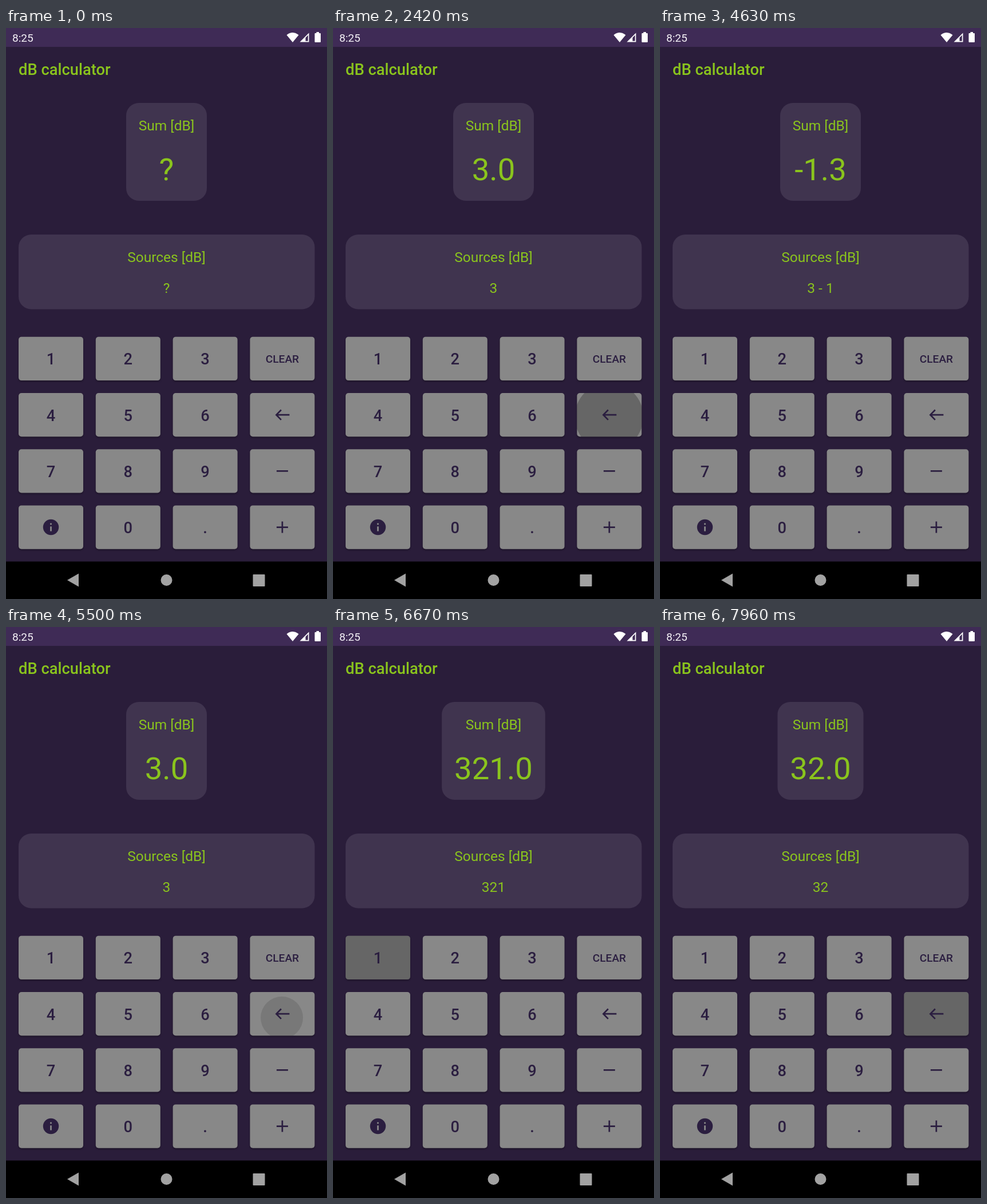
Write an HTML page that moves like this. It is 561x998 px and loops after 8000 ms.

```html
<!DOCTYPE html>
<html lang="en">
<head>
<meta charset="utf-8">
<title>dB calculator</title>
<style>
html, body { margin: 0; width: 100%; height: 100%; overflow: hidden; background: #2a1d3a; }
svg { display: block; width: 561px; height: 998px; font-family: Roboto, sans-serif; }
.green { fill: #8ac41d; }
.mid { text-anchor: middle; }
.medium { font-weight: 500; }
.label { font-size: 24.5px; }
.card { fill: #40344f; }
.ink { fill: #2b1e40; }
.line { fill: none; stroke: #2b1e40; stroke-width: 2.7; }
</style>
</head>
<body>
<svg viewBox="0 0 561 998">
  <defs><filter id="soft" x="-10%" y="-10%" width="120%" height="130%"><feGaussianBlur stdDeviation="1.6"/></filter></defs>
  <rect width="561" height="998" fill="#2a1d3a"/>
  <rect width="561" height="33" fill="#3f2b56"/>
  <text x="11" y="24" font-size="19.1" fill="#f4f1f6">8:25</text>
  <g fill="#fff">
    <path d="M490.5 12.2Q501 4 511.500 12.200L501 25Z"/>
    <path d="M513.500 24.500L529.500 8.500V24.500ZM523.500 22.800H527.800V12.600L523.500 16.900Z" fill-rule="evenodd"/>
    <path d="M540 9H542.500V7H547V9H549A1 1 0 0 1 550 10V24A1 1 0 0 1 549 25H540.500A1 1 0 0 1 539.500 24V10Z"/>
  </g>
  <text class="green medium" x="22" y="81.500" font-size="27.3">dB calculator</text>

  <rect id="sumCard" class="card" y="131" height="171" rx="22"/>
  <text class="green mid label" x="280.500" y="179">Sum [dB]</text>
  <text id="sum" class="green mid" x="280.500" y="265.500" font-size="54.5"></text>

  <rect class="card" x="22" y="361" width="517.500" height="130.500" rx="22"/>
  <text class="green mid label" x="280.500" y="409">Sources [dB]</text>
  <text id="sources" class="green mid label" x="280.500" y="463"></text>

  <g id="keys"></g>

  <rect y="932.500" width="561" height="65.500" fill="#000"/>
  <g fill="#a2a2a2">
    <path d="M107 965L127 953.500V976.500Z"/>
    <circle cx="280.500" cy="965" r="10"/>
    <rect x="431.500" y="955" width="21" height="21" rx="1"/>
  </g>
</svg>
<script>
const LOOP = 8000;
const KEYS = ['1', '2', '3', 'CLEAR', '4', '5', '6', 'back', '7', '8', '9', 'minus', 'info', '0', '.', 'plus'];
const KEY_W = 113, KEY_H = 76.3;

// touch time, key, delay until the display changes, sources shown afterwards
const TAPS = [
  [540, '3', 60, '3'],
  [1125, 'plus', 90, '3 +'],
  [1520, '1', 60, '3 + 1'],
  [1900, 'back', 60, '3 +'],
  [2295, 'back', 30, '3'],
  [2860, 'minus', 60, '3 -'],
  [3530, '1', 60, '3 - 1'],
  [4920, 'back', 60, '3 -'],
  [5465, 'back', 10, '3'],
  [5940, '2', 40, '32'],
  [6500, '1', 40, '321'],
  [7780, 'back', 40, '32']
];

const $ = id => document.getElementById(id);
const clamp = v => Math.max(0, Math.min(1, v));

const ICONS = {
  back: (x, y) => `<path class="line" d="M${x + 12.5} ${y}H${x - 10}M${x - 2} ${y - 8.7}L${x - 10.5} ${y}L${x - 2} ${y + 8.7}"/>`,
  minus: (x, y) => `<path class="line" d="M${x - 10} ${y}h20"/>`,
  plus: (x, y) => `<path class="line" d="M${x - 10} ${y}h20M${x} ${y - 10}v20"/>`,
  info: (x, y) => `<circle class="ink" cx="${x}" cy="${y}" r="13.7"/>` +
    `<path d="M${x} ${y - 7}v2.8M${x} ${y - 1.4}v8.400" stroke="#888" stroke-width="2.8"/>`
};

function buildKey(name, i) {
  const x = 22 + (i % 4) * 134.8, y = 539.8 + Math.floor(i / 4) * 98.2;
  const cx = x + KEY_W / 2, cy = y + KEY_H / 2;
  const box = `x="${x}" y="${y}" width="${KEY_W}" height="${KEY_H}" rx="5"`;
  const size = name === 'CLEAR' ? 19.1 : 27.3;
  const face = ICONS[name] ? ICONS[name](cx, cy)
    : `<text class="ink mid medium" x="${cx}" y="${cy + size * 0.36 + 0.6}" font-size="${size}">${name}</text>`;
  return `<rect ${box} transform="translate(0 2)" fill="#000" opacity=".3" filter="url(#soft)"/>` +
    `<rect ${box} fill="#888"/><clipPath id="clip${i}"><rect ${box}/></clipPath>` +
    `<g clip-path="url(#clip${i})"><circle id="ripple${i}" data-x="${cx}" data-y="${cy}" opacity="0"/></g>` + face;
}
$('keys').innerHTML = KEYS.map(buildKey).join('');

// level sum of an expression such as "3 - 1", to one decimal
function level(expr) {
  const part = expr.split(' ');
  let power = 10 ** (part[0] / 10);
  if (part[2]) power += (part[1] === '+' ? 1 : -1) * 10 ** (part[2] / 10);
  return (10 * Math.log10(power)).toFixed(1);
}

const ease = p => p * p * (3 - 2 * p);

function drawRipple(key, dt) {
  const el = $('ripple' + KEYS.indexOf(key));
  const p = clamp(dt / 225);
  const drift = 1 - p;
  el.setAttribute('cx', +el.dataset.x - 1 * drift);
  el.setAttribute('cy', +el.dataset.y + 8 * drift);
  el.setAttribute('r', 34 + 44 * ease(p));
  el.setAttribute('opacity', 0.25 * clamp(dt / 75) * (1 - clamp((dt - 225) / 150)));
}

function draw(t) {
  let expr = '?';
  for (const key of KEYS) $('ripple' + KEYS.indexOf(key)).setAttribute('opacity', 0);
  for (const [at, key, delay, text] of TAPS) {
    const dt = t - at;
    if (dt >= delay) expr = text;
    if (dt >= 0 && dt < 375) drawRipple(key, dt);
  }
  const sum = expr === '?' ? '?' : level(expr);
  $('sources').textContent = expr;
  $('sum').textContent = sum;
  const digits = sum.replace(/\D/g, '').length;
  const w = Math.max(141, 44 + 54.5 * (digits * 0.5615 + 0.263));
  $('sumCard').setAttribute('x', 280.5 - w / 2);
  $('sumCard').setAttribute('width', w);
}

const start = performance.now();
function tick() {
  draw((performance.now() - start) % LOOP);
  requestAnimationFrame(tick);
}
tick();
</script>
</body>
</html>
```
